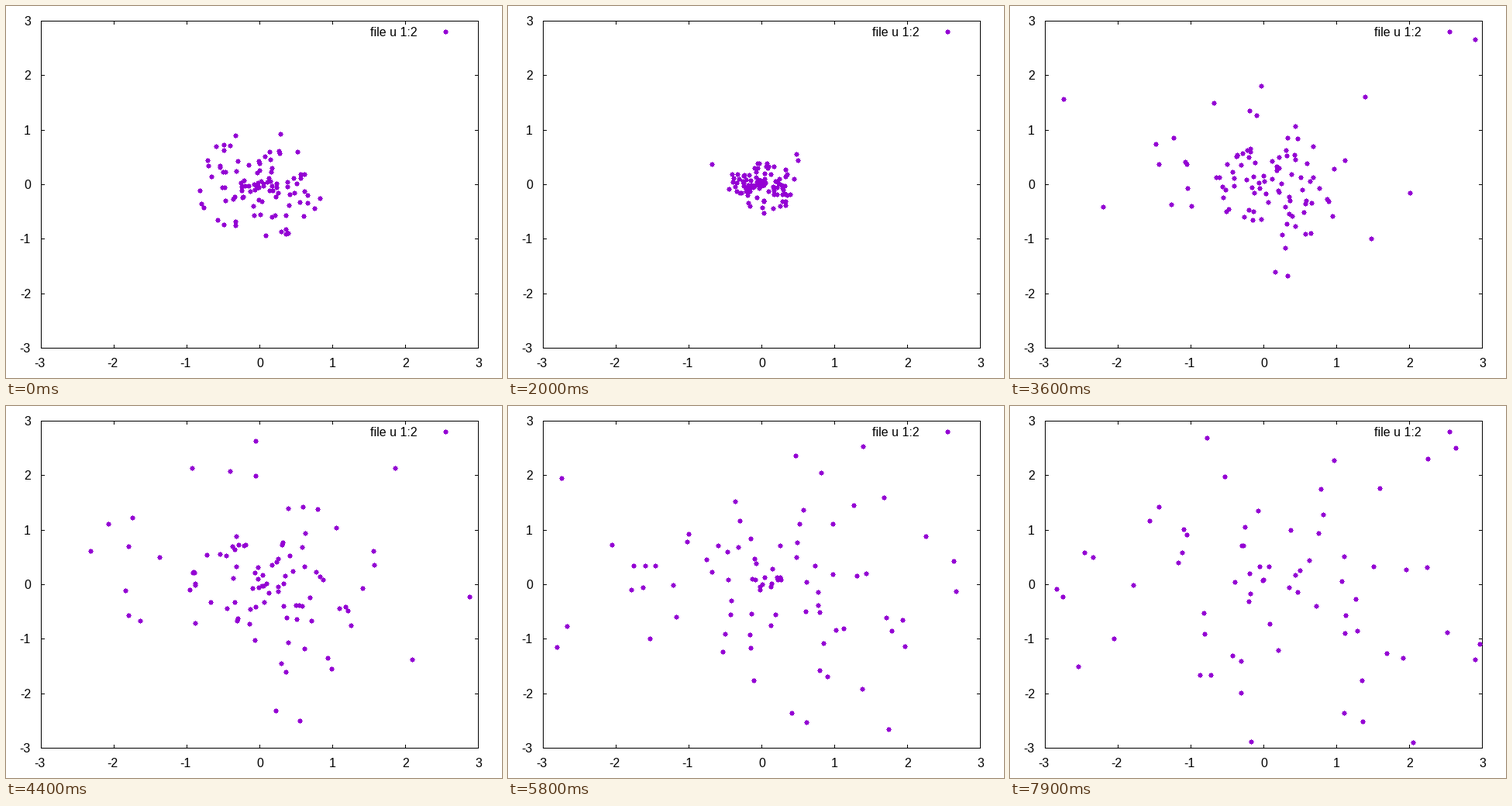
These frames come from a looping animation (640 px wide and 480 px high, 8000 ms). A matplotlib script:

```python
import numpy as np
import matplotlib.pyplot as plt
from matplotlib.animation import FuncAnimation
from matplotlib.patches import PathPatch, Rectangle
from matplotlib.path import Path

W, H, DPI = 640, 480, 100
FONT_PT = 16 * 72 / DPI
FRAMES, STEP = 80, 100
LEFT, RIGHT, TOP, BOTTOM = 45, 609, 19, 441
TICK = 5
VIOLET = "#9400d3"

# a cold cloud falls through its centre, then each body is flung out
N = 100
FALL = 2.6
rng = np.random.default_rng(7)
r0 = rng.uniform(.03, .99, N)
angle = rng.uniform(0, 2 * np.pi, N)
swirl = rng.uniform(-.3, .3, N)
fall_time = FALL * np.maximum(r0, .18)
launch = np.maximum(FALL * r0, rng.uniform(.9, FALL, N))
speed = rng.exponential(.47, N)
heading = angle + np.pi + rng.normal(0, .6, N)


def polar(r, a):
    return np.column_stack((r * np.cos(a), r * np.sin(a)))


def cloud(t):
    u = t / fall_time
    phase = np.pi / 2 * np.where(u < 1, u ** 1.3, 1.3 * u - .3)
    tau = np.maximum(t - launch, 0)
    size = r0 / (1 + 3 * speed * tau)
    drift = speed * tau ** 2 / (tau + .3)
    return (polar(size * np.cos(phase), angle)
            + polar(size * swirl * np.sin(phase), angle + np.pi / 2)
            + polar(drift, heading))


def to_px(x, y):
    return np.round(327 + 94 * x), np.round(230 - 70.33 * y)


fig = plt.figure(figsize=(W / DPI, H / DPI), dpi=DPI, facecolor="white")
ax = fig.add_axes([0, 0, 1, 1])
ax.set_xlim(0, W)
ax.set_ylim(H, 0)
ax.axis("off")


def bar(x, y, w=1, h=1):
    ax.add_patch(Rectangle((x, y), w, h, fc="black", lw=0,
                           antialiased=False, snap=False))


def label(x, y, text, ha):
    ax.text(x, y, text, ha=ha, va="baseline", family="Liberation Sans",
            fontsize=FONT_PT, color="black")


for y in (TOP, BOTTOM):
    bar(LEFT, y, w=RIGHT - LEFT + 1)
for x in (LEFT, RIGHT):
    bar(x, TOP, h=BOTTOM - TOP + 1)
for v in range(-3, 4):
    x, y = to_px(v, v)
    bar(x, TOP, h=TICK)
    bar(x, BOTTOM - TICK + 1, h=TICK)
    bar(LEFT, y, w=TICK)
    bar(RIGHT - TICK + 1, y, w=TICK)
    label(x - 2 * (v < 0) + .5, 466, str(v), "center")
    label(32, y + 6, str(v), "right")
label(531, 39, "file u 1:2", "right")

# stepped disc, seven pixels across
quarter = np.array([(3.5, .5), (2.5, .5), (2.5, 2.5), (.5, 2.5), (.5, 3.5)])
half = np.vstack((quarter, quarter[::-1] * (-1, 1)))
disc = np.vstack((half, half[::-1] * (1, -1)))
disc = np.vstack((disc, disc[:1])) + .5


def discs(x, y):
    centres = np.column_stack((x, y))
    return Path.make_compound_path(*(Path(disc + c, closed=True) for c in centres))


dots = PathPatch(discs([567], [33]), fc=VIOLET, lw=0, antialiased=False,
                 snap=False, zorder=5)
ax.add_patch(dots)


def draw(i):
    pts = cloud(i * STEP / 1000)
    pts = pts[np.abs(pts).max(axis=1) <= 3]
    x, y = to_px(pts[:, 0], pts[:, 1])
    dots.set_path(discs(np.append(x, 567), np.append(y, 33)))
    return dots,


anim = FuncAnimation(fig, draw, frames=FRAMES, interval=STEP, repeat=True,
                     repeat_delay=0, blit=False)
plt.show()
```
